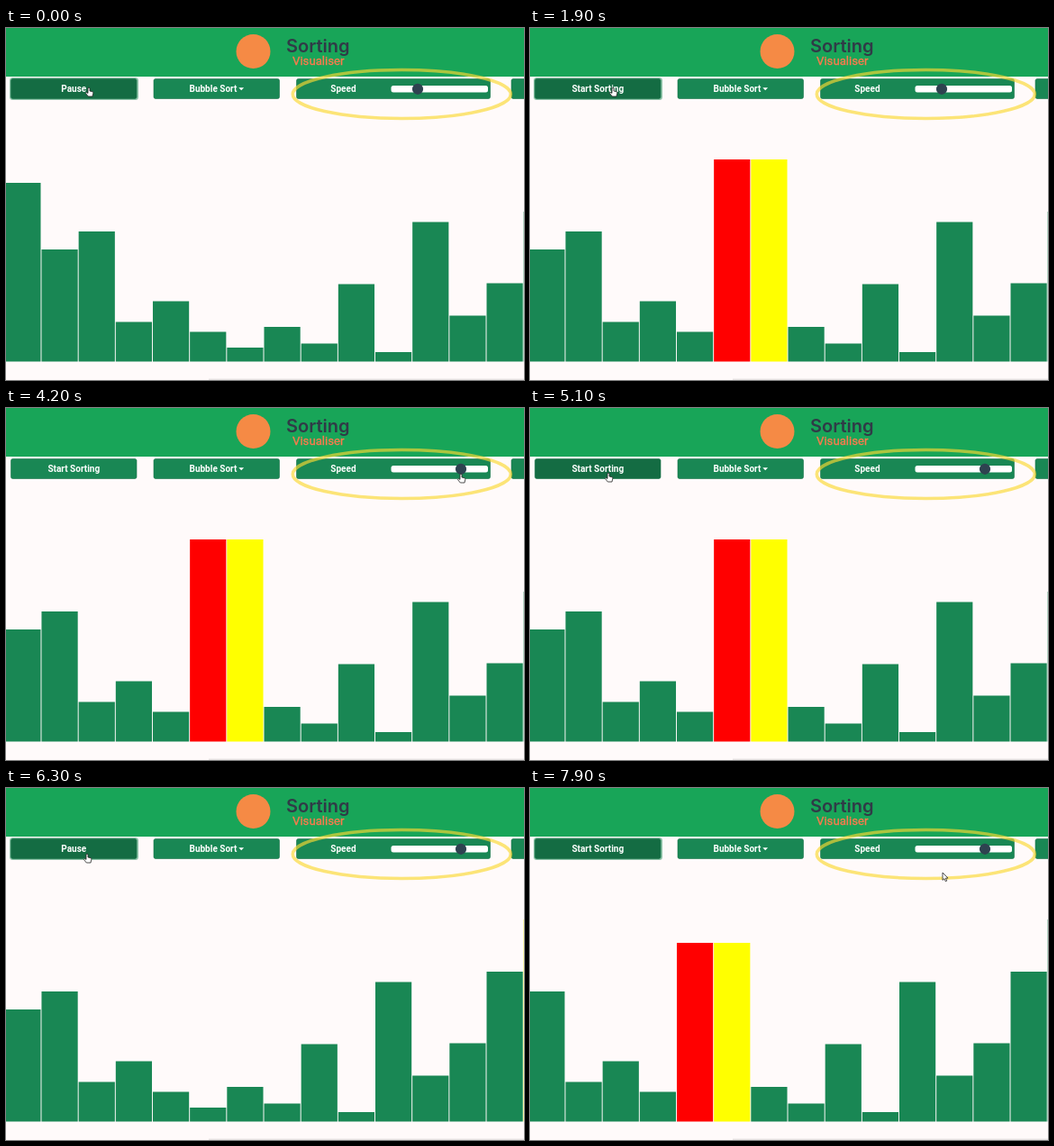
An HTML page that plays this animation: 575 by 391 pixels, repeating every 8 s.

```html
<!DOCTYPE html>
<html lang="en">
<head>
<meta charset="utf-8">
<title>Sorting Visualiser</title>
<style>
  html, body { margin: 0; width: 100%; height: 100%; overflow: hidden; background: #fffafa; }
  svg { display: block; width: 575px; height: 391px; }
  .label { font: bold 10px Roboto, sans-serif; fill: #fff; }
  .button { fill: #198754; stroke: #157347; stroke-width: .6; }
</style>
</head>
<body>
<svg viewBox="0 0 575 391">
  <rect width="575" height="391" fill="#fffafa"/>
  <rect width="575" height="54" fill="#18a558"/>
  <circle cx="274.5" cy="26" r="19" fill="#f58a45"/>
  <text x="311" y="27" font-family="Inter, sans-serif" font-weight="600" font-size="20" fill="#303a47">Sorting</text>
  <text x="318" y="41" font-family="Roboto, sans-serif" font-size="13.2" fill="#ff7a4d" stroke="#ff7a4d" stroke-width=".3">Visualiser</text>

  <rect id="ring" x="4" y="55" width="143" height="25" rx="3.5" fill="#8fc3a9"/>
  <rect id="start" class="button" x="5.5" y="56.5" width="139.5" height="22" rx="2"/>
  <rect class="button" x="164" y="56.5" width="139.5" height="22" rx="2"/>
  <rect class="button" x="322.5" y="56.5" width="215" height="22" rx="2"/>
  <rect class="button" x="561" y="56.5" width="140" height="22" rx="2"/>
  <text id="startLabel" class="label" x="75.3" y="71.3" text-anchor="middle"></text>
  <text class="label" x="203.5" y="71.3">Bubble Sort</text>
  <path d="M258.3 66.3h5.8l-2.9 2.9z" fill="#fff"/>
  <text class="label" x="360.3" y="71.3">Speed</text>
  <rect x="427.5" y="64" width="107.5" height="7.6" rx="2.5" fill="#fff"/>
  <circle id="thumb" cy="67.8" r="6.1" fill="#2e4250"/>

  <g id="bars"></g>
  <rect x="225" y="389.6" width="350" height="1.4" fill="#e6e2e2"/>
  <ellipse cx="439.3" cy="73.5" rx="121" ry="27" fill="none" stroke="#fad932" stroke-opacity=".65" stroke-width="3.6"/>

  <g id="cursor" stroke="#222" stroke-width=".8" stroke-linejoin="round" fill="#fff">
    <path id="hand" d="M-1 .8Q0-.6 1 .8V4l3.2.8Q5 5 4.8 6.3L4 10H-.7L-3.6 6.4Q-3.4 4.8-1 6.4z"/>
    <path id="arrow" d="M0 0V8.4L1.9 6.7 3.3 9.8 4.7 9.1 3.4 6.1H6z"/>
  </g>
</svg>
<script>
const LOOP = 8000, FLOOR = 370.5, PITCH = 41.17, BAR_WIDTH = 40.2;
const firstPass = [146, 172, 246, 226, 326.5, 303.5, 337.5, 355, 332, 350.5,
  284.5, 360, 215.5, 319.5, 283.5, 204];
const secondPass = [...firstPass.slice(1), firstPass[0]];

// Time, x and y of the pointer tip.
const pointerPath = [
  [0, 92, 66], [2200, 92, 66], [2900, 457, 73], [3500, 457, 73], [4000, 505, 73],
  [4200, 505, 73], [4900, 87, 72], [5100, 87, 72], [5400, 90, 73],
  [7200, 90, 73], [7750, 458, 94], [LOOP, 458, 94]
];

const el = id => document.getElementById(id);
const set = (node, attrs) => Object.entries(attrs).forEach(([k, v]) => node.setAttribute(k, v));
const show = (node, on) => node.setAttribute('visibility', on ? 'visible' : 'hidden');
const ease = u => u * u * (3 - 2 * u);

const bars = firstPass.map((_, i) => {
  const bar = document.createElementNS('http://www.w3.org/2000/svg', 'rect');
  set(bar, { x: -1.7 + (i - 1) * PITCH, width: BAR_WIDTH });
  return el('bars').appendChild(bar);
});

function pointerAt(t) {
  const n = pointerPath.findIndex(p => p[0] > t);
  const [t0, x0, y0] = pointerPath[n - 1], [t1, x1, y1] = pointerPath[n];
  const u = ease((t - t0) / (t1 - t0));
  return { x: x0 + (x1 - x0) * u, y: y0 + (y1 - y0) * u };
}

// Whole part: compared pair. Fraction: progress of its swap.
function sortProgress(t) {
  if (t < 5400) return Math.min((t - 30) / 265, 6.3);
  if (t < 6313) return 6.3 + (t - 5400) / 105;
  return Math.min((t - 6520) / 105, 5.3);
}

function drawBars(t) {
  const values = t < 6313 ? firstPass : secondPass;
  const progress = sortProgress(t), pair = Math.floor(progress), part = progress - pair;
  bars.forEach((bar, i) => {
    let top = values[i], fill = '#198754';
    if (i < pair) top = values[i + 1];
    if (i === pair) {
      top = part < .6 ? values[0] : values[i + 1];
      if (part < .85) fill = '#f00';
    }
    if (i === pair + 1) {
      top = values[0];
      fill = '#ff0';
    }
    set(bar, { y: top, height: FLOOR - top, fill });
  });
}

function draw(t) {
  drawBars(t);
  const { x, y } = pointerAt(t);
  const overRow = y < 79 && (x < 145 || (x > 164 && x < 303.5) || (x > 322.5 && x < 537.5));
  const focused = t < 3200 || t >= 5300;
  const running = t < 1750 || (t >= 5350 && t < 7100);
  set(el('cursor'), { transform: `translate(${x} ${y})` });
  show(el('hand'), overRow);
  show(el('arrow'), !overRow);
  show(el('ring'), focused);
  set(el('start'), { style: `fill:${focused || x < 145 ? '#146c43' : '#198754'}` });
  el('startLabel').textContent = running ? 'Pause' : 'Start Sorting';
  set(el('thumb'), { cx: t < 3500 ? 457 : t < 4000 ? x : 505 });
}

const began = performance.now();
function tick() {
  draw((performance.now() - began) % LOOP);
  requestAnimationFrame(tick);
}
tick();
</script>
</body>
</html>
```
